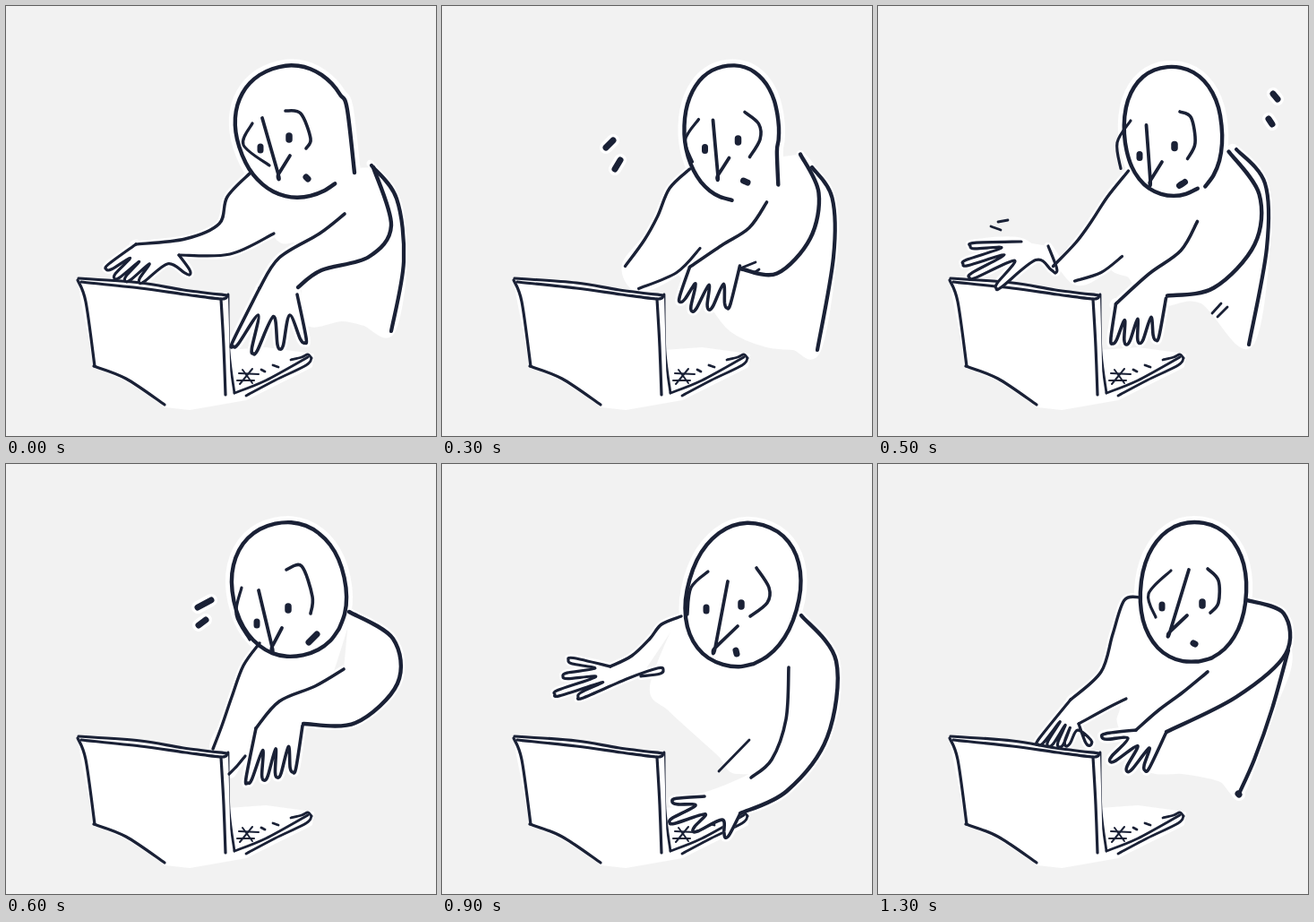
An HTML page that plays this animation: 480 by 480 pixels, repeating every 1.4 s.

```html
<!DOCTYPE html>
<html lang="en">
<head>
<meta charset="utf-8">
<title>Busy typist</title>
<style>
  html, body { margin: 0; width: 100%; height: 100%; overflow: hidden; background: #f2f2f2; }
  svg { display: block; width: 100vw; height: 100vh; }
  path { stroke-linecap: round; stroke-linejoin: round; }
  .white path { fill: #fff; stroke: #fff; }
  .ink path { fill: none; stroke: #1a2136; }
</style>
</head>
<body>
<svg viewBox="0 0 480 480">
  <g id="paper" class="white"></g>
  <g id="base" class="white"><path stroke-width="4" d="M247 386L290 383L342 390L340 402L268 438L205 449L178 446Z"/></g>
  <g id="baseInk" class="ink"></g>
  <g id="nearPaper" class="white"></g>
  <g class="white"><path stroke-width="2" d="M80 304L247 323L250 434L205 449L178 446L135 418L99 402Z"/></g>
  <g id="lidInk" class="ink"></g>
  <g id="farPaper" class="white"></g>
  <g id="lines" class="ink"></g>
</svg>
<script>
const STEP = 100, STEPS = 14;

const WIDTHS = {
  back: 4.2, far: 3.4, farHand: 3.2, farB: 3.2, near: 3.6, hand: 3.6, nearB: 4.4,
  head: 4.4, ear: 3.6, earL: 3.2, nose: 3.8, eyeL: 7, eyeR: 7.5, mouth: 7
};

// head: centre, radii, tilt, start and end angle. jaw: where the cheek line starts.
// hands: both ends of the wrist, then the fingertips. torso: its lower edge.
const POSES = [
  { at: 0, head: [322, 140, 64, 74, -20, 10, -289], jaw: '389,186',
    ear: '312,117 329,120 340,148 335,159', earL: '275,131 265,155 294,178',
    nose: '286,125 304,188 317,167', eyes: '284,159 316,147', mouth: '335,191 337,193',
    far: '273,186 247,213 238,243 200,260 145,266',
    farHand: '145,266 193,278 112,294 121,304 133,307 149,309 205,300',
    farB: '193,278 250,277 299,254', near: '378,232 350,254 305,281 283,315',
    hand: '283,315 325,322 254,380 276,388 306,383 333,376',
    nearB: '326,314 352,295 405,280 430,245 410,180',
    back: '408,178 436,215 444,285 430,363',
    torso: '303,256 325,262 334,300 336,352 375,348 400,353' },
  { at: 2, head: [321, 140, 61, 77, -25, 10, -226], jaw: '392,180',
    ear: '315,119 338,128 344,140 336,163', earL: '272,135 266,162 289,181',
    nose: '288,130 305,192 315,174', eyes: '283,162 314,148', mouth: '338,188 344,191',
    far: '277,196 260,207 256,250 252,285 249,318',
    farB: '249,363 284,337 298,308', near: '389,186 355,197 325,201 301,213',
    hand: '301,213 353,220 279,263 293,279 315,275 336,272',
    nearB: '354,230 388,257 418,232 422,192 400,171',
    back: '426,200 439,230 440,290 424,390',
    torso: '249,340 262,352 284,347 330,358 380,382 400,388',
    marks: ['335,292 350,286', '348,298 354,294'], drops: ['183,158 191,150', '193,182 199,172'] },
  { at: 4, head: [341, 142, 57, 82, 6, 65, -278],
    ear: '361,118 369,135 366,158 351,174', earL: '301,118 277,137 270,167',
    nose: '317,125 311,186 326,165', eyes: '304,157 347,152', mouth: '335,202 338,203',
    far: '276,168 248,200 225,220 200,237 160,263',
    farHand: '160,263 190,268 103,268 95,288 102,303 132,315 198,298',
    farB: '190,268 240,258 278,233', near: '336,252 331,298 300,333 252,370',
    hand: '252,370 312,360 254,398 266,403 281,403 300,402',
    nearB: '314,357 360,340 404,287 419,225 400,160',
    back: '400,160 432,198 434,270 414,378',
    torso: '280,238 314,258 316,310 318,362 345,372 385,372',
    marks: ['134,241 145,239', '126,246 137,250', '373,343 383,332', '379,347 390,336'],
    drops: ['441,98 446,104', '436,126 440,132'] },
  { at: 6, head: [316, 140, 63, 75, -12, 45, -315],
    ear: '313,118 330,114 342,148 340,167', earL: '263,138 257,168 272,196',
    nose: '282,141 297,204 308,183', eyes: '280,178 315,161', mouth: '338,199 347,190',
    far: '283,200 265,225 252,260 241,292 231,318',
    farB: '249,346 258,337 267,326', near: '377,229 345,248 305,265 279,295',
    hand: '279,295 331,292 270,356 288,353 303,350 320,344',
    nearB: '332,290 390,289 437,245 432,195 383,165',
    torso: '240,325 250,342 268,326 280,310 300,290 340,285',
    drops: ['214,160 229,152', '215,180 223,174'] },
  { at: 9, head: [336, 146, 62, 81, 16, 60, -300],
    ear: '351,116 365,138 363,155 344,170', earL: '297,120 278,138 274,168',
    nose: '319,131 305,205 330,181', eyes: '295,162 334,157', mouth: '328,208 329,212',
    far: '267,170 245,179 232,195 212,214 188,226',
    farHand: '188,226 222,237 141,219 135,237 126,257 152,260 247,230',
    near: '387,227 384,285 368,330 345,350',
    hand: '293,371 333,390 257,377 254,400 280,410 316,417',
    nearB: '333,390 385,365 430,305 440,220 401,169',
    torso: '236,248 255,272 290,304 312,324 330,342 375,320',
    marks: ['343,308 309,343'] },
  { at: 11, head: [338, 150, 60, 79, 12, 60, -300],
    ear: '347,119 360,138 359,155 346,173', earL: '274,123 265,152 275,176',
    nose: '316,126 306,207 333,181', eyes: '292,169 329,161', mouth: '336,208 338,211',
    far: '273,180 256,189 247,225 235,275 224,313',
    near: '366,235 320,247 285,260 262,282',
    hand: '262,282 300,284 244,325 257,334 272,331 288,326',
    nearB: '300,284 360,287 425,252 433,205 396,168',
    back: '436,215 442,250 446,300 433,355',
    torso: '224,313 262,334 300,333 330,338 350,341 400,350',
    marks: ['229,187 227,221', '246,185 241,224'] },
  { at: 13, head: [352, 143, 59, 78, 4, 80, -280],
    ear: '368,117 380,130 380,155 371,166', earL: '327,119 302,145 310,171',
    nose: '347,118 326,187 345,169', eyes: '317,159 362,156', mouth: '352,200 354,201',
    far: '293,149 275,152 262,190 249,232 215,263',
    farHand: '215,263 224,290 179,313 190,315 202,316 210,315 237,314',
    farB: '224,290 255,273 277,262', near: '368,232 340,255 313,275 288,297',
    hand: '288,297 322,299 250,305 259,332 278,343 298,342',
    nearB: '322,299 400,260 455,212 453,167 412,152',
    back: '458,208 440,273 420,330 403,368',
    torso: '276,264 272,292 300,338 340,342 365,346 385,352',
    drops: ['402,368 403,369'] }
];

const LID = ['81,304 150,309 198,317 247,323', '84,308 150,315 200,322 240,327 247,324',
  '80,306 89,330 99,402', '98,402 134,416 177,445', '240,327 243,380 245,434'];
const BASE = ['248,322 249,385 255,432', '255,432 290,418 337,392', '318,395 330,392 337,389 341,393',
  '341,393 335,401 300,418 268,435', '285,406 289,408', '298,401 304,403'];
const KEYS = ['260,410 282,411', '258,418 277,418', '264,406 275,421', '275,405 261,422'];

const layer = id => document.getElementById(id);
const lerp = (a, b, k) => a + (b - a) * k;
const mix = (p, q, k) => [lerp(p[0], q[0], k), lerp(p[1], q[1], k)];
const parse = text => text.split(' ').map(p => p.split(',').map(Number));

// Smooth curve through every point.
function curve(pts) {
  const at = i => pts[Math.max(0, Math.min(pts.length - 1, i))];
  let d = 'M' + pts[0];
  for (let i = 0; i < pts.length - 1; i++) {
    const [a, b, c, e] = [at(i - 1), at(i), at(i + 1), at(i + 2)];
    const c1 = [0, 1].map(n => b[n] + (c[n] - a[n]) / 6);
    const c2 = [0, 1].map(n => c[n] - (e[n] - b[n]) / 6);
    d += 'C' + [c1, c2, c].map(p => p.map(v => v.toFixed(1))).join(' ');
  }
  return d;
}

// Tilted egg, slightly squarer than an ellipse.
function egg([cx, cy, rx, ry, tilt, from, to], jaw) {
  const soft = v => Math.sign(v) * Math.abs(v) ** 0.93;
  const t = tilt * Math.PI / 180, count = 24;
  const pts = Array.from({ length: count + 1 }, (_, i) => {
    const a = lerp(from, to, i / count) * Math.PI / 180;
    const x = rx * soft(Math.cos(a)), y = ry * soft(Math.sin(a));
    return [cx + x * Math.cos(t) - y * Math.sin(t), cy + x * Math.sin(t) + y * Math.cos(t)];
  });
  if (jaw) pts[0] = parse(jaw)[0];
  return pts;
}

// Outline of a hand: round fingers growing from the knuckles between the wrist ends.
function fingers([a, b, ...tips]) {
  const knuckle = i => mix(a, b, (i + 0.5) / tips.length);
  const root = i => mix(knuckle(i), tips[i], 0.42);
  const pts = [a];
  tips.forEach((tip, i) => {
    const k = knuckle(i), len = Math.hypot(tip[0] - k[0], tip[1] - k[1]);
    const [dx, dy] = [(tip[0] - k[0]) / len, (tip[1] - k[1]) / len];
    const side = s => [tip[0] - dx * 5 + dy * s, tip[1] - dy * 5 - dx * s];
    const turn = (b[0] - a[0]) * dy - (b[1] - a[1]) * dx > 0 ? -3.3 : 3.3;
    pts.push(side(turn), tip, side(-turn));
    if (i < tips.length - 1) pts.push(mix(root(i), root(i + 1), 0.5));
  });
  return [...pts, b];
}

const nose = ([top, tip, end]) => [top, tip, tip, end];
const eye = ([x, y]) => [[x, y - 2], [x, y + 2]];

function build(pose) {
  const parts = {};
  for (const name of ['torso', 'back', 'far', 'farB', 'near', 'nearB', 'ear', 'earL', 'mouth'])
    if (pose[name]) parts[name] = parse(pose[name]);
  for (const name of ['hand', 'farHand'])
    if (pose[name]) parts[name] = fingers(parse(pose[name]));
  const [left, right] = parse(pose.eyes);
  return Object.assign(parts, {
    head: egg(pose.head, pose.jaw), nose: nose(parse(pose.nose)), eyeL: eye(left), eyeR: eye(right)
  });
}

for (const pose of POSES) pose.parts = build(pose);

// Key poses are held for one step; steps between them are even in-betweens.
function poseAt(step) {
  const i = POSES.findLastIndex(p => p.at <= step);
  const a = POSES[i], b = POSES[(i + 1) % POSES.length];
  const k = step === a.at ? 0 : (step - a.at) / (b.at - a.at);
  const extra = k > 0.5 ? b : a, parts = {};
  for (const name in extra.parts) {
    const p = a.parts[name], q = b.parts[name];
    parts[name] = p && q ? p.map((v, n) => mix(v, q[n], k)) : extra.parts[name];
  }
  return { parts, extra };
}

const path = (pts, width) => `<path d="${curve(pts)}" stroke-width="${width}"/>`;
const paths = (list = [], width) => list.map(s => path(parse(s), width)).join('');

function draw(step) {
  const { parts, extra } = poseAt(step);
  const join = (...names) => names.flatMap(n => parts[n] || []);
  const shoulder = parts.nearB[parts.nearB.length - 1];
  const torso = [parts.far[0], ...parts.torso, ...join('back').reverse(), shoulder];
  layer('paper').innerHTML = path(torso, 8) + path(join('far', 'farHand', 'farB'), 8) +
    path(join('near', 'hand', 'nearB'), 9) + path(parts.head, 14) + paths(extra.drops, 14);
  layer('nearPaper').innerHTML = path(join('hand'), 3);
  layer('farPaper').innerHTML = parts.farHand ? path(parts.farHand, 2) : '';
  layer('lines').innerHTML =
    Object.keys(WIDTHS).filter(n => parts[n]).map(n => path(parts[n], WIDTHS[n])).join('') +
    paths(extra.marks, 2.8) + paths(extra.drops, 7);
}

layer('baseInk').innerHTML = paths(BASE, 2.8) + paths(KEYS, 2);
layer('lidInk').innerHTML = paths(LID, 3.2);

let shown = -1;
function tick() {
  const step = Math.floor(performance.now() / STEP) % STEPS;
  if (step !== shown) draw(shown = step);
  requestAnimationFrame(tick);
}
tick();
</script>
</body>
</html>
```
